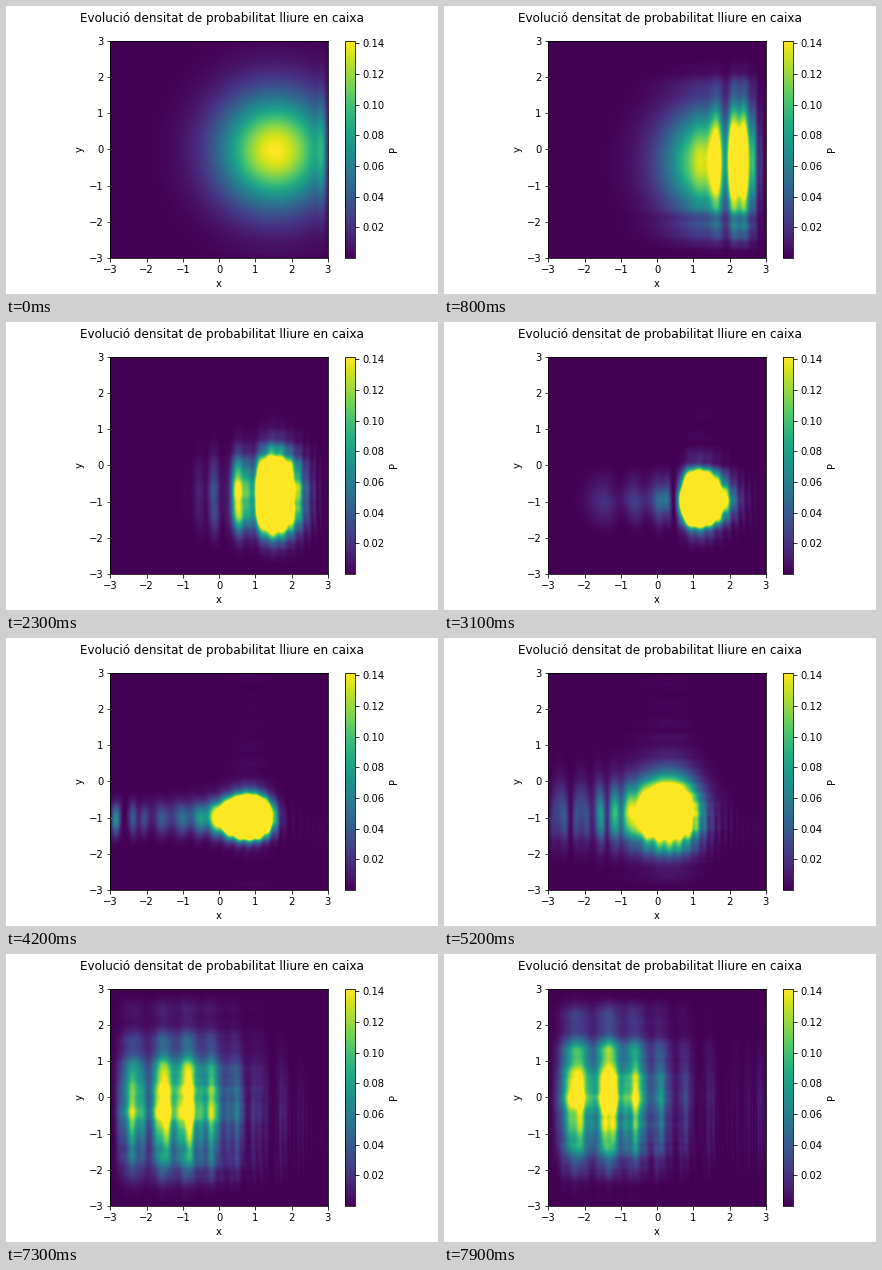
Animation of 432 by 288 pixels, one loop 8000 ms. Source, as a matplotlib script:

```python
import numpy as np
import matplotlib.pyplot as plt
from matplotlib.animation import FuncAnimation

# Wave packet in a hard-walled box with a harmonic well, hbar = m = 1
L = 3.0
N = 200
DT = 0.02
OMEGA = 2.0
WIDTH = 1.5
X0, Y0 = 1.5, 0.0
PX, PY = 2.0, -2.0
FRAMES = 80

grid = np.linspace(-L, L, N + 2)[1:-1]
h = grid[1] - grid[0]
x, y = np.meshgrid(grid, grid)

# Each direction carries its own kinetic term and half of the potential
off = -0.25j * DT / h**2
diag = 0.5j * DT * (1 / h**2 + 0.25 * OMEGA**2 * (x**2 + y**2))


def factor():
    """Forward-sweep factors of the tridiagonal solve along axis 0."""
    inv = np.empty((N, N), complex)
    inv[0] = 1 / (1 + diag[0])
    for i in range(1, N):
        inv[i] = 1 / (1 + diag[i] - off**2 * inv[i - 1])
    return inv


inv = factor()


def explicit(psi):
    out = (1 - diag) * psi
    out[1:] -= off * psi[:-1]
    out[:-1] -= off * psi[1:]
    return out


def implicit(rhs):
    out = rhs * inv
    for i in range(1, N):
        out[i] -= off * inv[i] * out[i - 1]
    for i in range(N - 2, -1, -1):
        out[i] -= off * inv[i] * out[i + 1]
    return out


def adi_step(psi):
    psi = implicit(explicit(psi).T).T
    return implicit(explicit(psi.T).T)


def evolve():
    r2 = (x - X0) ** 2 + (y - Y0) ** 2
    psi = np.exp(-r2 / (2 * WIDTH**2) + 1j * (PX * x + PY * y))
    psi /= np.sqrt(np.pi) * WIDTH
    frames = []
    for _ in range(FRAMES):
        psi = adi_step(psi)
        frames.append(np.abs(psi) ** 2)
    return frames


density = evolve()

fig, ax = plt.subplots(figsize=(6, 4), dpi=72)
fig.subplots_adjust(left=0.125, right=0.9, bottom=0.125, top=0.88)
fig.suptitle("Evolució densitat de probabilitat lliure en caixa")
im = ax.imshow(density[0], origin="lower", extent=(-L, L, -L, L), cmap="viridis")
ax.set_xlabel("x")
ax.set_ylabel("y")
fig.colorbar(im, ax=ax, label="P", ticks=0.02 * np.arange(1, 8))


def update(n):
    im.set_data(density[n])
    return (im,)


anim = FuncAnimation(fig, update, frames=FRAMES, interval=100,
                     repeat=True, repeat_delay=0)
plt.show()
```
